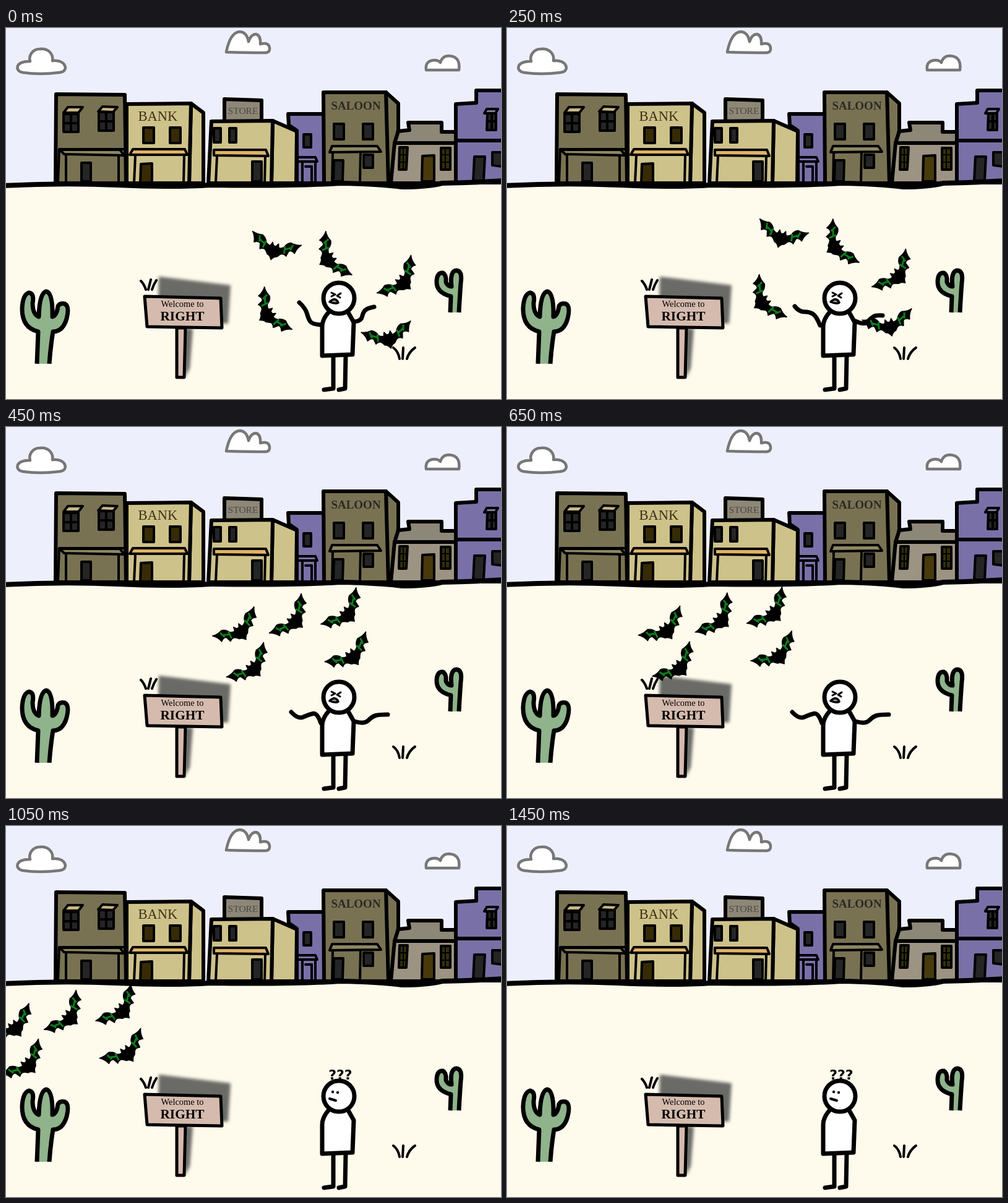
These frames come from a looping animation (800 px wide and 600 px high, 1650 ms). An HTML page:

```html
<!DOCTYPE html>
<html lang="en">
<head>
<meta charset="utf-8">
<title>Bats in the desert town</title>
<style>
  html, body { margin: 0; width: 100%; height: 100%; overflow: hidden; background: #fefaec; }
  svg { display: block; width: 800px; height: 600px; }
  .ink { stroke: #000; stroke-width: 6; stroke-linejoin: round; stroke-linecap: round; }
  .thin { stroke-width: 4; }
  .line { fill: none; }
  .olive { fill: #787253; }
  .sand { fill: #cec28b; }
  .purple { fill: #7a70a8; }
  .stone { fill: #9c9383; }
  .roof { fill: #8d8777; }
  .awning { fill: #dfb266; }
  .eave { fill: #8d8762; }
  .dark { fill: #252525; }
  .brown { fill: #372b06; }
  .cloud { fill: #fff; stroke: #777; stroke-width: 4.5; stroke-linejoin: round; }
  .cactus { fill: #8fb38b; stroke-width: 7; stroke-linecap: butt; }
  .wood { fill: #d5bbae; stroke-width: 5; }
  .body { fill: #fff; stroke-width: 7; }
  .limb { fill: none; stroke-width: 7; }
  text { font-family: "Liberation Serif", Serif, serif; text-anchor: middle; }
  .puzzle { font: bold 22px "DejaVu Sans", sans-serif; }
</style>
</head>
<body>
<svg viewBox="0 0 800 600">
  <defs>
    <filter id="soft" x="-20%" y="-20%" width="140%" height="140%"><feGaussianBlur stdDeviation="2.5"/></filter>
    <g id="bat">
      <path stroke="#000" stroke-width="1.5" stroke-linejoin="round" d="M-41 0 Q-33 3 -24 1 Q-17 4 -15 11 Q-10 15 -7 14 L-5 8 L-2 13 H2 L5 8 L7 14 Q10 15 15 11 Q17 4 24 1 Q33 3 41 0 Q35 7 34 16 Q28 12 24 15 L22 24 Q16 20 12 24 L8 29 Q4 29 0 36 Q-4 29 -8 29 L-12 24 Q-16 20 -22 24 L-24 15 Q-28 12 -34 16 Q-35 7 -41 0Z"/>
      <path fill="none" stroke="#0b7d1c" stroke-width="3" d="M-28 3 L-26 13 M-16 9 L-18 21 M-26 9 L-17 14 M28 3 L26 13 M16 9 L18 21 M26 9 L17 14"/>
    </g>
  </defs>

  <path fill="#eeeffd" d="M0 0H800V250H0Z"/>
  <path fill="#fefaec" d="M0 250H800V600H0Z"/>

  <g class="cloud">
    <path d="M27 72 C14 70 14 53 39 54 C36 45 43 34 54 34 C69 32 77 43 75 53 C97 50 103 71 86 72 Q55 76 27 72Z"/>
    <path d="M356 39 Q362 8 377 6 Q389 6 392 22 Q396 10 404 10 Q412 12 411 26 Q426 22 426 34 Q426 39 420 40 Q390 40 356 39Z"/>
    <path d="M679 68 Q677 53 692 52 Q699 52 702 56 Q705 45 716 45 Q735 46 732 68Z"/>
  </g>

  <!-- buildings, left to right -->
  <g class="ink olive">
    <path d="M81 107 L192 108 L194 251 H80Z"/>
    <path class="line thin" d="M87 196H192 M97 206V248 M182 207V248 M86 196L84 250"/>
    <path class="eave thin" d="M87 197H184L191 206L94 204Z"/>
    <path class="dark thin" d="M122 218H137V248H122Z M93 139H117V168H93Z M150 136H174V166H150Z"/>
    <path class="line thin" d="M105 139V168 M93 154H117 M162 136V166 M150 151H174"/>
    <path class="thin" fill="#c9b682" d="M100 128H124L117 137H93Z M156 127L180 128L173 136L149 135Z"/>
  </g>
  <g class="ink sand">
    <path d="M299 122 L319 137 V251 H296Z"/>
    <path d="M195 123 L299 122 L296 251 H195Z"/>
    <path class="line thin" d="M209 206L207 250 M288 206L287 250"/>
    <path class="awning thin" d="M205 196H289L293 205H200Z"/>
    <path class="brown thin" d="M222 161H239V186H222Z M265 161H282V186H265Z M218 220L236 219V250H217Z"/>
  </g>
  <g class="ink sand">
    <path class="roof" d="M353 115L413 117V152H353Z"/>
    <path d="M431 150L470 167L469 251H429Z"/>
    <path d="M332 151L431 150L429 251H327Z"/>
    <path class="line thin" d="M341 207L339 250 M419 207L418 250"/>
    <path class="awning thin" d="M336 197H420L424 207L336 206Z"/>
    <path class="dark thin" d="M336 162H347V185H336Z M361 162H372V185H361Z M398 216H413V248H398Z"/>
  </g>
  <g class="ink purple">
    <path d="M456 139H514V251H470L470 166L457 157Z"/>
    <path class="line thin" d="M473 209H500L503 216H473 M479 217V248 M484 224H494V248 M500 217V248"/>
    <path class="dark thin" d="M481 172H493V193H481Z"/>
  </g>
  <g class="ink olive">
    <path d="M614 104L634 122V165L621 251H616Z"/>
    <path d="M513 104H614L618 251H514Z"/>
    <path class="line thin" d="M528 202L527 250 M573 202L572 250"/>
    <path class="eave thin" d="M527 191H600L606 200L523 201Z"/>
    <path class="dark thin" d="M530 155H546V180H530Z M577 155H593V180H577Z M578 205H593V226H578Z M530 214H545L544 248H529Z"/>
  </g>
  <g class="ink stone">
    <path d="M628 186H727V251H622Z"/>
    <path class="roof" d="M634 167L652 165L650 153H704V168H727V186H628Z"/>
    <path class="thin" fill="#332e0b" d="M636 193H649L647 229H635Z M703 194H718V229H703Z"/>
    <path class="line" stroke-width="2" style="stroke-width:2" d="M642 194V228 M636 205H648 M636 217H648 M710 195V228 M703 205H718 M703 217H718"/>
    <path class="thin" fill="#483a0b" d="M673 207L692 206V248H672Z"/>
  </g>
  <g class="ink purple">
    <path d="M727 123L760 121V101H810V250H727Z"/>
    <path class="line" d="M727 182H800"/>
    <path class="dark thin" d="M778 138H792V165H777Z M786 201H803V224L786 222Z M757 208H774L772 247H755Z"/>
    <path class="line thin" d="M785 138V165 M778 151H792"/>
    <path class="thin" fill="#7f79a0" d="M777 131H795L791 138H773Z"/>
  </g>

  <g fill="#3d3213">
    <text x="245.500" y="150" font-size="22.500">BANK</text>
    <text x="383" y="139" font-size="15.500" fill="#4b4840">STORE</text>
    <text x="565.500" y="132" font-size="19" font-weight="bold" fill="#2b2923">SALOON</text>
  </g>

  <path class="ink line" style="stroke-width:8" d="M-5 255 Q90 250 180 254 T330 254 Q460 256 540 251 Q600 252 640 257 Q680 257 705 251 Q760 250 805 247"/>

  <!-- desert -->
  <path class="ink cactus" d="M50 543 L52 491 Q26 485 26 454 Q27 431 37 428 Q46 429 43 445 Q43 463 53 467 Q54 428 65 426 Q76 428 75 467 Q82 465 84 450 Q87 444 95 446 Q103 450 98 470 Q92 491 76 491 Q72 515 70 543"/>
  <path class="ink cactus" d="M718 460 L719 434 Q695 428 696 409 Q697 395 706 396 Q712 399 711 411 Q714 418 720 418 Q717 393 728 392 Q738 393 735 412 Q733 440 732 460"/>
  <g fill="#6a6a66" filter="url(#soft)">
    <path d="M247 402L363 416L359 478H245Z M289 486H302L297 550L289 566Z"/>
  </g>
  <path class="ink line thin" d="M218 409Q223 414 226 423 M234 407L230 423 M243 408Q239 414 236 423 M626 517Q634 523 636 535 M642 517L641 535 M661 517Q651 524 648 535"/>
  <g class="ink wood">
    <path d="M276 485H290L288 565H276Z"/>
    <path d="M224 434L347 437L349 485L228 483Z"/>
  </g>
  <text x="285" y="451" font-size="14.400">Welcome to</text>
  <text x="285" y="473" font-size="21.300" font-weight="bold">RIGHT</text>

  <!-- person -->
  <path class="ink limb" d="M529 530V583L514 585 M549 530L548 583L538 585"/>
  <path class="ink body" d="M522 459Q511 471 511 483L511 530L560 528L562 476L552 458"/>
  <circle class="ink body" cx="538" cy="437" r="25"/>
  <g id="angry">
    <path id="arms" class="ink limb"/>
    <path class="ink line" style="stroke-width:3" d="M526 428L532 431L526 434 M541 429L535 433L540 436"/>
    <path class="ink" fill="#999" style="stroke-width:3.500" d="M523 443Q532 434 537 444Q533 447 523 443Z"/>
  </g>
  <g id="calm">
    <circle cx="528" cy="430" r="2.200"/><circle cx="536" cy="431" r="2.200"/>
    <path class="ink line thin" d="M523 441L533 444"/>
    <text class="puzzle" x="540.500" y="410">???</text>
  </g>
  <g id="bats"></g>
</svg>
<script>
const LOOP = 1650, FLEE = 450, CALM = 1050;
const $ = id => document.getElementById(id);

// home: middle between wing tips while swarming; row: the same while fleeing
const bats = [
  { home: [438, 340], tilt: 16, row: [246, 313], rowTilt: -35 },
  { home: [538, 364], tilt: 59, row: [330, 300], rowTilt: -51 },
  { home: [627, 398], tilt: -48, row: [416, 288], rowTilt: -46 },
  { home: [440, 453], tilt: 57, row: [427, 354], rowTilt: -36 },
  { home: [614, 483], tilt: -13, row: [265, 375], rowTilt: -43 }
];

// step: 50 ms ticks; shift: each bat's offset; arms: five points from hand to shoulder or back
const poses = [
  { step: 0, shift: [0, 0, 0, 0, 0, 0, 0, 0, 0, 0],
    left: [474, 444, 484, 453, 489, 471, 495, 479, 508, 480],
    right: [563, 475, 574, 474, 577, 460, 584, 453, 595, 451] },
  { step: 2, shift: [0, 20, 0, 0, 0, 10, 0, 10, 10, 10],
    left: [472, 444, 485, 449, 488, 470, 494, 480, 508, 480],
    right: [563, 474, 576, 460, 592, 473, 604, 479, 616, 477] },
  { step: 5, shift: [10, -20, 10, -20, -10, -10, -10, -20, 0, -20],
    left: [465, 450, 472, 459, 489, 459, 500, 466, 506, 481],
    right: [563, 474, 578, 481, 588, 469, 597, 464, 607, 465] },
  { step: 7, shift: [10, 0, 0, -20, 0, -20, 0, -10, 0, -10],
    left: [461, 461, 472, 473, 489, 465, 503, 462, 509, 479],
    right: [563, 476, 579, 481, 592, 468, 603, 465, 617, 465] }
];

for (const bat of bats) {
  bat.node = document.createElementNS("http://www.w3.org/2000/svg", "use");
  bat.node.setAttribute("href", "#bat");
  $("bats").append(bat.node);
}

function poseAt(step) {
  const next = poses.findIndex(p => p.step > step);
  if (next < 0) return poses[poses.length - 1];
  const a = poses[next - 1], b = poses[next];
  const k = (step - a.step) / (b.step - a.step);
  const mix = key => a[key].map((v, i) => v + (b[key][i] - v) * k);
  return { shift: mix("shift"), left: mix("left"), right: mix("right") };
}

// smooth curve through the midpoints of five points
function curve(p) {
  let d = `M${p[0]} ${p[1]}`;
  for (let i = 2; i < 8; i += 2) {
    const last = i === 6;
    const x = last ? p[8] : (p[i] + p[i + 2]) / 2;
    const y = last ? p[9] : (p[i + 1] + p[i + 3]) / 2;
    d += `Q${p[i]} ${p[i + 1]} ${x} ${y}`;
  }
  return d;
}

function draw(now) {
  const t = now % LOOP;
  const fleeing = t >= FLEE, calm = t >= CALM;
  const pose = poseAt(Math.min(Math.floor(t / 50), 8));
  const stride = Math.floor((t - FLEE) / 200) - 1;

  bats.forEach((bat, i) => {
    const [x, y] = fleeing
      ? [bat.row[0] - 121.3 * stride, bat.row[1] - 1.3 * stride]
      : [bat.home[0] + pose.shift[2 * i], bat.home[1] + pose.shift[2 * i + 1]];
    const tilt = fleeing ? bat.rowTilt : bat.tilt;
    bat.node.setAttribute("transform", `translate(${x} ${y}) rotate(${tilt})`);
  });

  $("arms").setAttribute("d", curve(pose.left) + curve(pose.right));
  $("angry").style.display = calm ? "none" : "";
  $("calm").style.display = calm ? "" : "none";
}

const start = performance.now();
function tick() {
  draw(performance.now() - start);
  requestAnimationFrame(tick);
}
tick();
</script>
</body>
</html>
```
